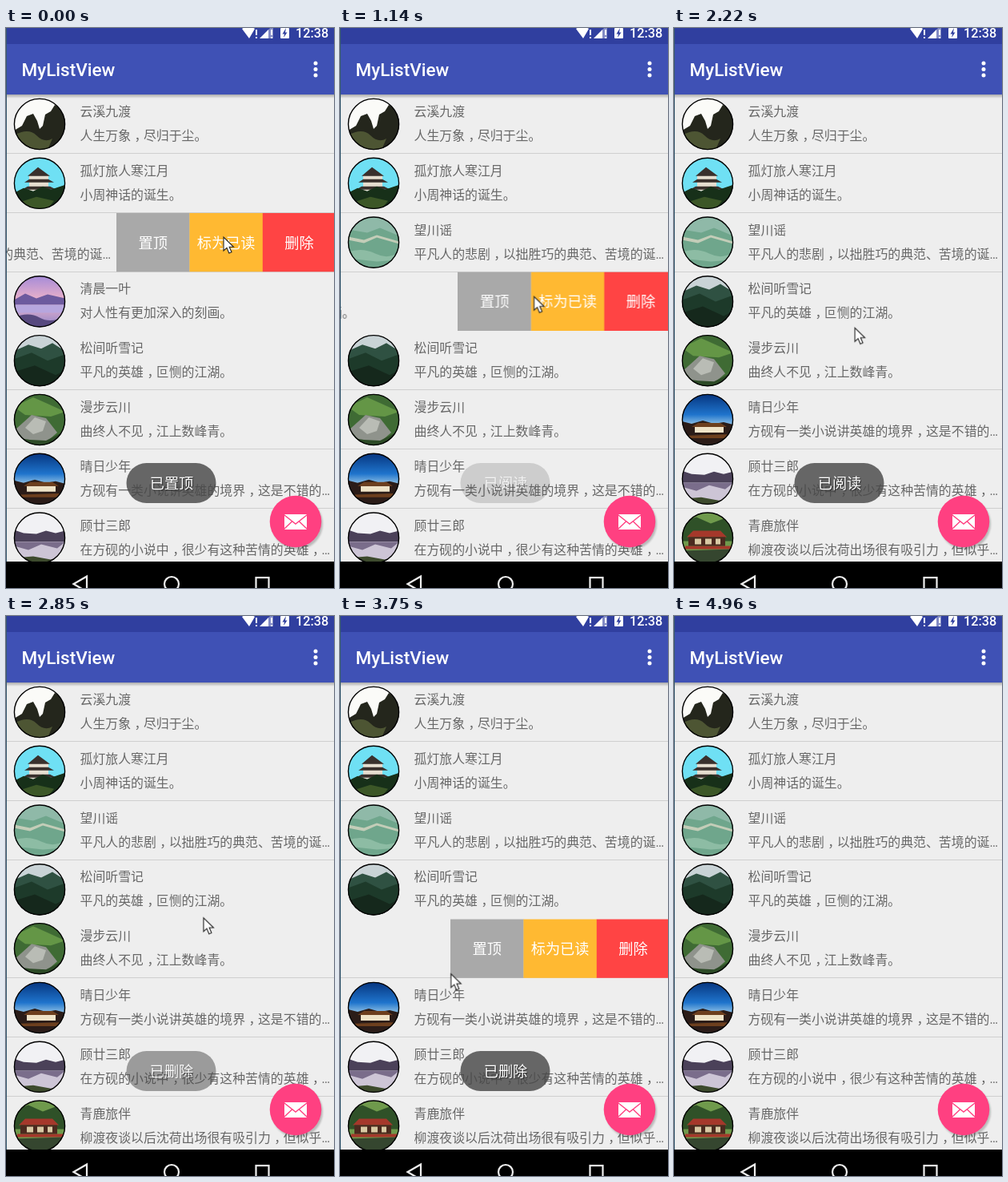
An HTML page that plays this animation: 410 px wide and 699 px high, repeating every 4990 ms.

```html
<!DOCTYPE html>
<html lang="zh-CN">
<head>
<meta charset="utf-8">
<title>MyListView</title>
<style>
html, body { margin: 0; width: 100%; height: 100%; overflow: hidden; background: #eee; }
svg { display: block; width: 410px; height: 699px; font-family: Roboto, 'Noto Sans CJK SC', 'Noto Sans CJK', sans-serif; }
.row text { font-size: 15.9px; fill: #676767; }
.row .menu text, .toast text { font-size: 18.2px; fill: #fff; text-anchor: middle; }
.toast text { text-shadow: 1px 1px 1px #0008; }

.anim { animation: 4990ms linear infinite both; }
.gone { animation-name: gone; }
.lift { animation-name: lift; }
.slide2 { animation-name: slide2; }
.slide3 { animation-name: slide3; }
.slide4 { animation-name: slide4; }
.slide5 { animation-name: slide5; }
.toast1 { animation-name: toast1; }
.toast2 { animation-name: toast2; }
.toast3 { animation-name: toast3; }
.cursor { animation-name: cursor; }

/* the fourth row is deleted, those below jump up one place */
@keyframes gone { 0%, 33.02% { visibility: visible; } 33.03%, 100% { visibility: hidden; } }
@keyframes lift { 0%, 33.02% { transform: none; } 33.03%, 100% { transform: translateY(-73.8px); } }

/* swipe menus: slow-start closing, slow-end opening */
@keyframes slide2 {
  0%, 4.6% { transform: translateX(-274px); animation-timing-function: cubic-bezier(.33, 0, .67, .33); }
  9.4%, 100% { transform: translateX(0); }
}
@keyframes slide3 {
  0%, 17.8% { transform: translateX(0); }
  18.8% { transform: translateX(-24px); animation-timing-function: ease-out; }
  23.6%, 100% { transform: translateX(-274px); }
}
@keyframes slide4 {
  0%, 33.02% { transform: translateX(0); }
  33.03% { transform: translateX(-250px); animation-timing-function: cubic-bezier(.35, .2, .7, .5); }
  38%, 100% { transform: translateX(0); }
}
@keyframes slide5 {
  0%, 67.9% { transform: translateX(0); }
  68.9%, 69.4% { transform: translateX(-24px); animation-timing-function: ease-out; }
  73.9%, 82.96% { transform: translateX(-274px); animation-timing-function: cubic-bezier(.33, 0, .67, .33); }
  85.94%, 100% { transform: translateX(0); }
}

@keyframes toast1 { 0%, 18% { opacity: 1; } 22%, 100% { opacity: 0; } }
@keyframes toast2 { 0%, 22% { opacity: 0; } 25.6%, 51% { opacity: 1; } 55%, 100% { opacity: 0; } }
@keyframes toast3 { 0%, 55% { opacity: 0; } 58.5%, 91% { opacity: 1; } 95.5%, 100% { opacity: 0; } }

@keyframes cursor {
  0%, 5% { transform: translate(272px, 261px); }
  14.2% { transform: translate(175px, 330px); }
  16.2%, 17.8% { transform: translate(163px, 338px); }
  19.4% { transform: translate(100px, 338px); }
  25.6% { transform: translate(355px, 333px); }
  27.4%, 33.07% { transform: translate(365px, 335px); }
  43.2% { transform: translate(216px, 345px); }
  44.49% { transform: translate(226px, 374px); }
  46.9%, 50.3% { transform: translate(236px, 408px); }
  54% { transform: translate(275px, 365px); }
  60.7% { transform: translate(215px, 390px); }
  66%, 67.9% { transform: translate(163px, 414px); }
  68.9%, 69.4% { transform: translate(139px, 414px); }
  71.4% { transform: translate(90px, 416px); }
  81%, 85.6% { transform: translate(214px, 494px); }
  93%, 100% { transform: translate(214px, 710px); }
}
</style>
</head>
<body>
<svg viewBox="0 0 410 699">
  <defs>
    <clipPath id="disc"><circle r="32"/></clipPath>
    <linearGradient id="shade" x2="0" y2="1">
      <stop stop-color="#000" stop-opacity=".28"/><stop offset="1" stop-color="#000" stop-opacity="0"/>
    </linearGradient>
    <linearGradient id="dusk" x2="0" y2="1">
      <stop stop-color="#06357f"/><stop offset=".4" stop-color="#1f74cc"/><stop offset=".6" stop-color="#8fc0e4"/>
    </linearGradient>
    <linearGradient id="pink" x2="0" y2="1">
      <stop stop-color="#a58bd8"/><stop offset=".5" stop-color="#f0b4c8"/><stop offset="1" stop-color="#8f86cc"/>
    </linearGradient>
    <filter id="soft" x="-30%" y="-30%" width="160%" height="160%"><feGaussianBlur stdDeviation="1"/></filter>
  </defs>

  <rect width="410" height="699" fill="#eee"/>
  <path d="M1 156.5H410M1 230.5H410M1 304.5H410M1 451.5H410M1 525.5H410M1 599.5H410" stroke="#cfcfcf"/>
  <g id="list"></g>

  <rect y="83" width="410" height="5" fill="url(#shade)"/>
  <rect width="410" height="20" fill="#303f9f"/>
  <rect y="20" width="410" height="63" fill="#3f51b5"/>
  <text x="19.5" y="60" font-size="22.5" font-weight="500" fill="#fff">MyListView</text>
  <g fill="#fff">
    <circle cx="387" cy="44" r="2.5"/><circle cx="387" cy="51.5" r="2.5"/><circle cx="387" cy="59" r="2.5"/>
    <text x="362" y="12" font-size="16.3" font-weight="500">12:38</text>
    <path d="M295 1Q303 -5 311 1L304 13Z"/>
    <path d="M312 2h2v7h-2zm0 9h2v2h-2z"/>
    <path d="M317 13L328 2V13Z"/>
    <path d="M328 13V2L334 -3V13Z" opacity=".4"/>
    <path d="M331 2h2v7h-2zm0 9h2v2h-2z"/>
    <rect x="343" y="0" width="11" height="13" rx="1"/>
  </g>
  <path d="M350 0L345.500 7.500H348L347 12L351.500 5.500H349Z" fill="#303f9f"/>

  <circle cx="364" cy="619" r="32" fill="#000" opacity=".22" filter="url(#soft)"/>
  <circle cx="362" cy="616" r="32.300" fill="#ff4081"/>
  <rect x="348" y="607" width="28" height="19" rx="1" fill="#fff"/>
  <path d="M348 608L362 619L376 608M348 625L357.500 616M376 625L366.500 616" fill="none" stroke="#ff4081" stroke-width="1.400"/>

  <rect y="666" width="410" height="33" fill="#000"/>
  <g fill="none" stroke="#eee" stroke-width="2.200">
    <path d="M84.500 694L101 684.500V703.500Z"/><circle cx="207" cy="694" r="9"/><rect x="312.500" y="686" width="16" height="16"/>
  </g>
  <rect width="1" height="666" fill="#34586f"/>

  <g id="toasts"></g>
  <path class="anim cursor" d="M0 0V17L4 13.400L6.800 20L10 18.700L7.200 12.300H12.500Z" fill="#fff" stroke="#222" stroke-width="1.100"/>
</svg>
<script>
const PITCH = 73.8, TOP = 83, WIDTH = 412, BUTTON = 91.4;

// title, subtitle, then the avatar as backdrop and [colour, path] layers
const rows = [
  ['云溪九渡', '人生万象，尽归于尘。', '#fbfbf8', [
    ['#24261c', 'M-32 8L-22 2L-16 -10L-8 -13L-3 -4L0 6L4 2L7 -12L14 -16L19 -24L25 -20L32 -8V32H-32Z'],
    ['#4d5533', 'M-32 14Q-14 4 -4 14T16 18L10 32H-32Z']]],
  ['孤灯旅人寒江月', '小周神话的诞生。', '#6fe0f4', [
    ['#e6ded0', 'M-13 -11H11V10H-13Z'],
    ['#39302c', 'M-15 -9L-2 -20L13 -9ZM-19 -1L-13 -5H11L18 -1ZM-22 8L-15 4H13L21 8Z'],
    ['#173019', 'M-32 12L-20 6L-8 10L4 4L14 8L32 2V32H-32Z'],
    ['#3c5727', 'M-26 24L-4 17L18 22L10 32H-20Z']]],
  ['望川谣', '平凡人的悲剧，以拙胜巧的典范、苦境的诞…', '#8fb9a8', [
    ['#6fa68c', 'M-32 -16L-8 -12L8 -18L32 -8V32H-32Z'],
    ['#c3cdb8', 'M-32 -7L-12 -3L4 -9L32 -1V2L4 -6L-12 1L-32 -3Z'],
    ['#8dbca4', 'M-32 12Q-14 6 2 14T32 12V22L4 24L-32 20Z']]],
  ['清晨一叶', '对人性有更加深入的刻画。', 'url(#pink)', [
    ['#6d5a9e', 'M-32 -2L-18 -10L-4 -4L10 -9L32 -4V4H-32Z'],
    ['#b7a6de', 'M-32 4H32V14H-32Z'],
    ['#57497f', 'M-32 20Q-14 12 0 20T32 18V32H-32Z']]],
  ['松间听雪记', '平凡的英雄，叵恻的江湖。', '#c9d3d6', [
    ['#2f5142', 'M-32 -12L-14 -20L2 -15L16 -22L32 -12V32H-32Z'],
    ['#1d3a2a', 'M-32 -2L-10 -10L10 0L32 -8V32H-32Z'],
    ['#15281c', 'M-32 14L-6 6L20 18L32 12V32H-32Z']]],
  ['漫步云川', '曲终人不见，江上数峰青。', '#3f6b34', [
    ['#649646', 'M-32 -16L-8 -28L10 -20L32 -10L14 -4L-18 -6Z'],
    ['#8f938c', 'M-30 12L-10 -6L8 -2L22 16L8 28L-18 26Z'],
    ['#b9bcb5', 'M-18 10L-6 -3L8 2L4 14L-8 18Z'],
    ['#2c4a26', 'M-32 22L-12 25L8 26L28 16L20 32H-32Z']]],
  ['晴日少年', '方砚有一类小说讲英雄的境界，这是不错的…', 'url(#dusk)', [
    ['#2b1c18', 'M-32 2L-20 5L-6 1L8 5L20 3L32 6V32H-32Z'],
    ['#efe3c8', 'M-16 9H20V16H-16Z'],
    ['#6d3f1e', 'M-20 9L-12 4H16L24 9ZM-32 20L32 18V23H-32Z']]],
  ['顾廿三郎', '在方砚的小说中，很少有这种苦情的英雄，…', '#f1f1f4', [
    ['#4b4159', 'M-32 -10L-20 -6L-4 -5L8 -9L20 -6L32 -9V5H-32Z'],
    ['#cdc5d6', 'M-32 5H32V32H-32Z'],
    ['#7a6d8b', 'M-32 5H32L22 13L2 8L-14 15L-32 10Z'],
    ['#3d4a2d', 'M-32 25L-8 23L14 27L32 24V32H-32Z']]],
  ['青鹿旅伴', '柳渡夜谈以后沈荷出场很有吸引力，但似乎…', '#6f9a4c', [
    ['#2f5128', 'M-32 -20L-14 -26L4 -18L20 -24L32 -10V4H-32Z'],
    ['#a5382b', 'M-26 -1L-18 -9H16L24 -1ZM-28 10H30V14H-28Z'],
    ['#4b2a1f', 'M-24 -1H22V10H-24Z'],
    ['#d9c9a4', 'M-16 1H-8V8H-16ZM-3 1H5V8H-3ZM10 1H16V8H10Z'],
    ['#35462f', 'M-32 16L32 14V32H-32Z']]],
];

const buttons = [['置顶', '#a9a9a9'], ['标为已读', '#ffb932'], ['删除', '#ff4444']];

const avatar = (back, layers) => `
  <g transform="translate(42 37)">
    <g clip-path="url(#disc)"><rect x="-32" y="-32" width="64" height="64" fill="${back}"/>
      ${layers.map(([fill, d]) => `<path d="${d}" fill="${fill}"/>`).join('')}</g>
    <circle r="31.6" fill="none" stroke="#000" stroke-width="1.4"/>
  </g>`;

// commas sit in the middle of their cell
const centreCommas = text =>
  text.replace(/，([^，]*)/g, '<tspan dx="4.5">，</tspan><tspan dx="-4.5">$1</tspan>');

const menu = buttons.map(([label, fill], i) => `
  <g transform="translate(${WIDTH + i * BUTTON} 0)">
    <rect y=".3" width="${BUTTON + .3}" height="73.3" fill="${fill}"/>
    <text x="${BUTTON / 2}" y="44">${label}</text>
  </g>`).join('');

const place = i => i === 3 ? 'anim gone' : i > 3 ? 'anim lift' : '';
const slide = i => i > 1 && i < 6 ? `anim slide${i}` : '';

document.getElementById('list').innerHTML = rows.map(([title, sub, back, layers], i) => `
  <g class="row" transform="translate(0 ${TOP + i * PITCH})">
    <g class="${place(i)}"><g class="${slide(i)}">
      ${avatar(back, layers)}
      <text x="92.500" y="27">${title}</text><text x="92.500" y="57">${centreCommas(sub)}</text>
      <g class="menu">${menu}</g>
    </g></g>
  </g>`).join('');

document.getElementById('toasts').innerHTML = ['已置顶', '已阅读', '已删除'].map((label, i) => `
  <g class="toast anim toast${i + 1}">
    <rect x="150.500" y="543" width="112" height="50" rx="25" fill="#484848" fill-opacity=".82"/>
    <text x="207" y="575">${label}</text>
  </g>`).join('');
</script>
</body>
</html>
```
